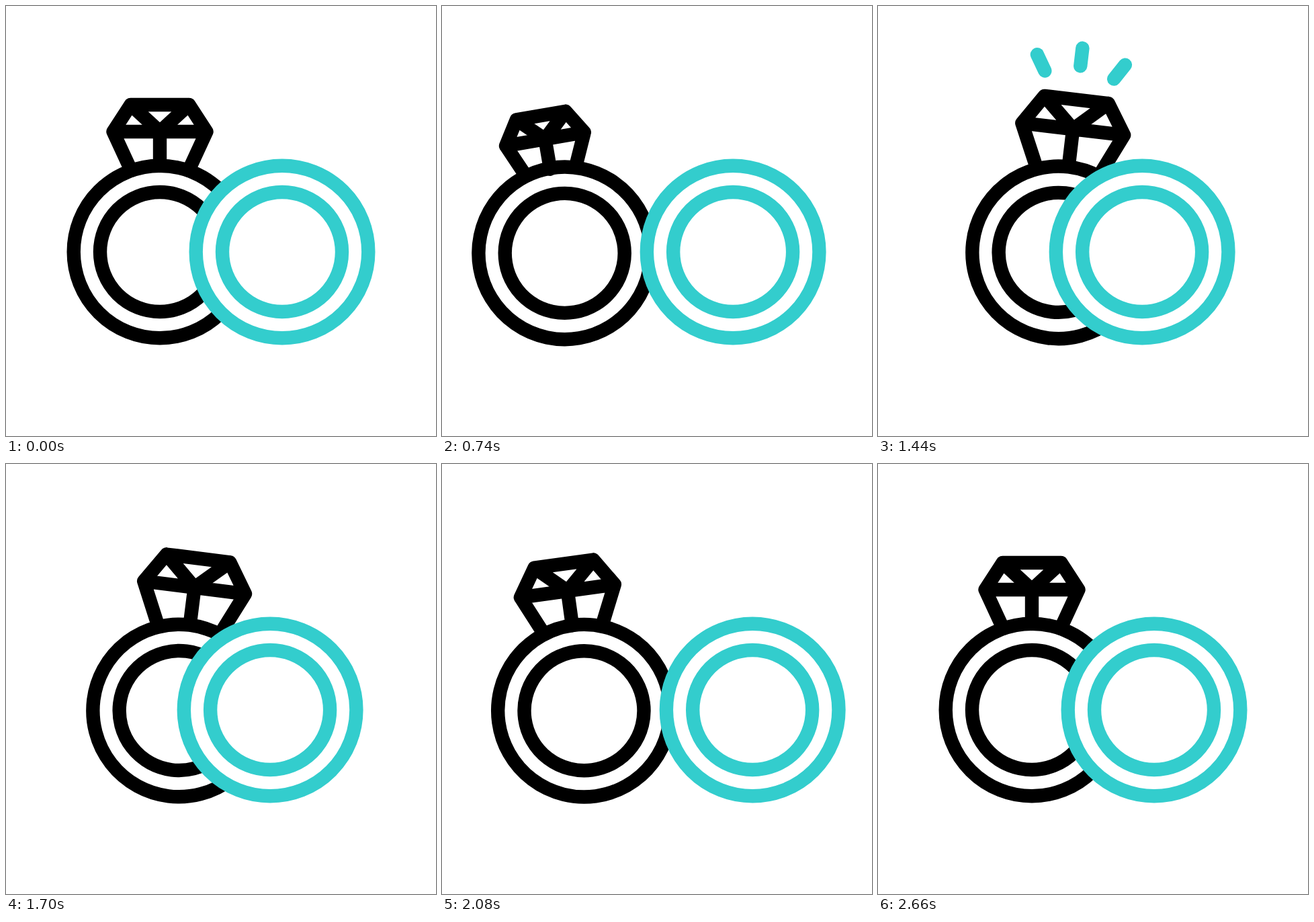
Recreate the animation shown at these times as an HTML page. Size 640x640 px, loop 3 s.

```html
<!DOCTYPE html>
<html>
<head>
<meta charset="utf-8">
<style>
  html, body { margin: 0; width: 100%; height: 100%; overflow: hidden; background: #fff; }
  svg { display: block; width: 100%; height: 100%; }
  .line { fill: none; stroke-width: 20.4; stroke-linecap: round; stroke-linejoin: round; }
  .black { stroke: #000; }
  .teal { stroke: #33cdcd; }
</style>
</head>
<body>
<svg viewBox="0 0 640 640">
  <g id="diamondRing">
    <path id="gem" class="line black"/>
    <circle class="line black" r="128.3"/>
    <circle class="line black" r="89"/>
    <path id="sparks" class="line teal"/>
  </g>
  <g id="band">
    <circle r="137" fill="#fff"/>
    <circle class="line teal" r="128.3"/>
    <circle class="line teal" r="89"/>
  </g>
</svg>
<script>
const LOOP = 3000, RADIUS = 128, CENTER_Y = 366;
const byId = id => document.getElementById(id);
const diamondRing = byId("diamondRing"), band = byId("band");
const gem = byId("gem"), sparks = byId("sparks");

const portion = (t, from, to) => Math.min(1, Math.max(0, (t - from) / (to - from)));
const ramp = (t, from, to) => {
  const x = portion(t, from, to);
  return x * x * (3 - 2 * x);
};

// The stone grows from the ring's rim while its line weight stays the same.
function gemPath(size) {
  const rim = -119, height = size < 1 ? 1 - 0.76 * (1 - size) : size;
  const p = (x, y) => `${x * size} ${rim + (y - rim) * height}`;
  const topL = p(-43.5, -219), topR = p(43.5, -219);
  const sideL = p(-69.5, -179), sideR = p(69.5, -179), mid = p(0, -179);
  return `M${p(-45, -126)}L${sideL}L${topL}L${topR}L${sideR}L${p(45, -126)}` +
    `M${sideL}L${sideR}M${topL}L${mid}L${topR}M${mid}L${p(0, -128)}`;
}

// Three rays shoot outwards, the tail following the head.
function sparkPath(t) {
  const head = 70 * portion(t, 1156, 1570), tail = 70 * portion(t, 1340, 1670);
  if (head - tail < 0.5) return "";
  return [-1, 0, 1].map(side => {
    const dx = 0.53 * side, dy = side ? -0.85 : -1;
    const p = u => `${40.4 * side + dx * u} ${(side ? -248 : -258) + dy * u}`;
    return `M${p(tail)}L${p(head)}`;
  }).join("");
}

function draw(now) {
  const t = now % LOOP;

  const left = ramp(t, 180, 790), right = ramp(t, 790, 1400), rest = ramp(t, 1400, 2010);
  const x = 229 + 25 * (2 * right - left - rest);
  const size = 1 - 0.15 * left + 0.25 * right - 0.1 * ramp(t, 1600, 2250);

  const apart = ramp(t, 200, 915), together = ramp(t, 915, 1520);
  const away = ramp(t, 1660, 2058), home = ramp(t, 2058, 2660);
  const tilt = -11.5 * apart + 19.1 * together - 15.5 * away + 7.9 * home;
  const bandX = 411 + 26 * apart - 46 * together + 71.4 * away - 51.4 * home;

  // The diamond ring rocks about its lowest point.
  diamondRing.setAttribute("transform",
    `translate(${x} ${CENTER_Y + RADIUS}) rotate(${tilt}) translate(0 ${-RADIUS})`);
  band.setAttribute("transform", `translate(${bandX} ${CENTER_Y})`);
  gem.setAttribute("d", gemPath(size));
  sparks.setAttribute("d", sparkPath(t));
}

const start = performance.now();
function tick() {
  draw(performance.now() - start);
  requestAnimationFrame(tick);
}
tick();
</script>
</body>
</html>
```
